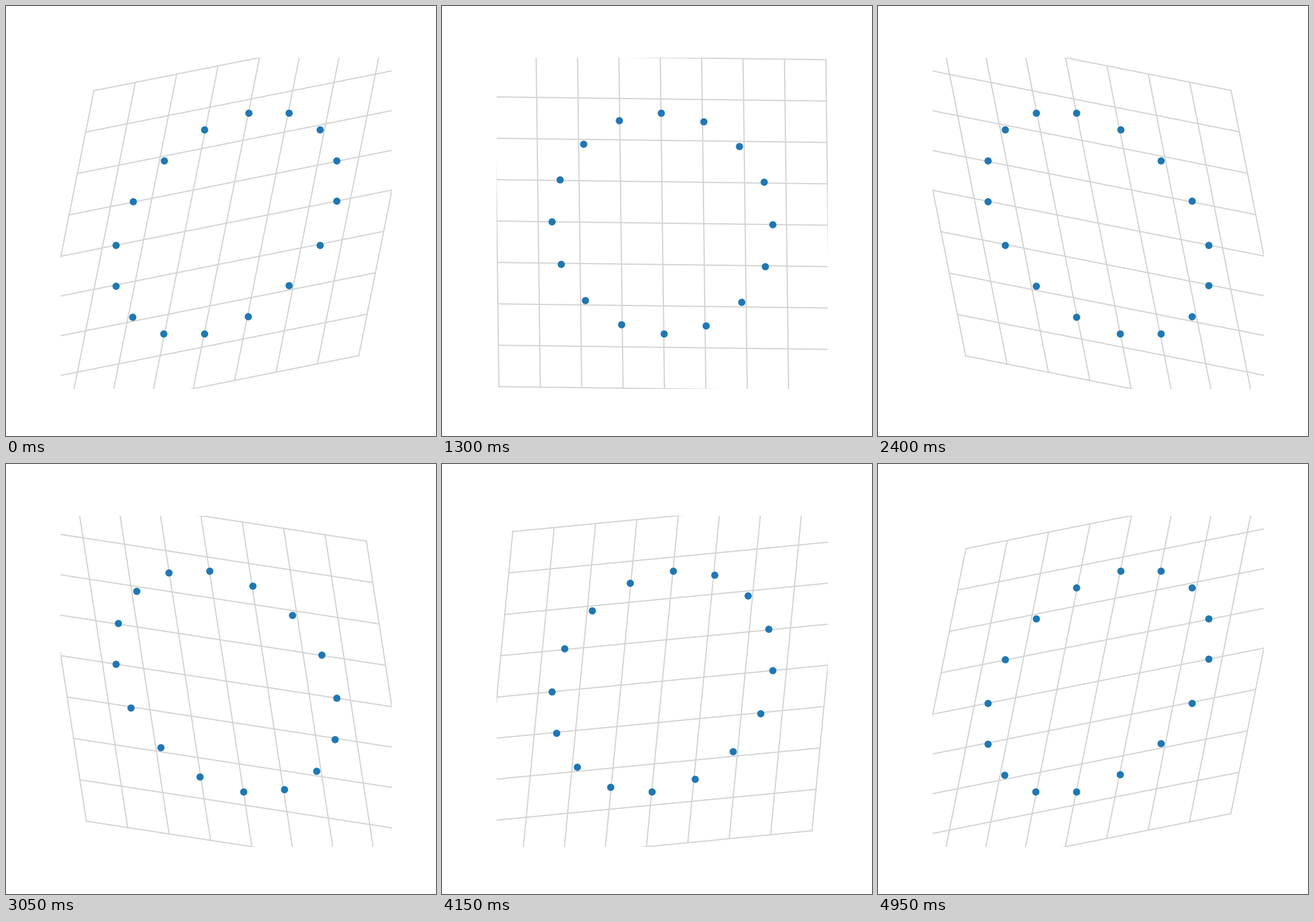
A matplotlib script for the animation above (5000 ms loop, 748x748 px).

```python
import numpy as np
import matplotlib.pyplot as plt
from matplotlib.animation import FuncAnimation

FRAMES = 100
INTERVAL = 50
LIMIT = 1.5
SHEAR = 0.2

fig, ax = plt.subplots(figsize=(7.48, 7.48), dpi=100)
ax.set_aspect("equal")
ax.set_xlim(-LIMIT, LIMIT)
ax.set_ylim(-LIMIT, LIMIT)
ax.axis("off")

# Each grid line is a 2x2 array: row of x values, row of y values
ends = np.array([-LIMIT, LIMIT])
steps = np.linspace(-LIMIT, LIMIT, 9)
segments = [np.array([[c, c], ends]) for c in steps]
segments += [np.array([ends, [c, c]]) for c in steps]
grid = [ax.plot([], [], color="lightgray", lw=1.5)[0] for _ in segments]

theta = np.arange(16) * 2 * np.pi / 16
circle = np.array([np.cos(theta), np.sin(theta)])
dots, = ax.plot([], [], "o", color="tab:blue", markersize=8)


def update(i):
    h = SHEAR * np.cos(2 * np.pi * i / FRAMES)
    matrix = np.array([[1, h], [h, 1]])
    for line, segment in zip(grid, segments):
        line.set_data(*(matrix @ segment))
    dots.set_data(*(matrix @ circle))
    return [*grid, dots]


anim = FuncAnimation(fig, update, frames=FRAMES, interval=INTERVAL,
                     repeat=True, repeat_delay=0)
plt.show()
```
